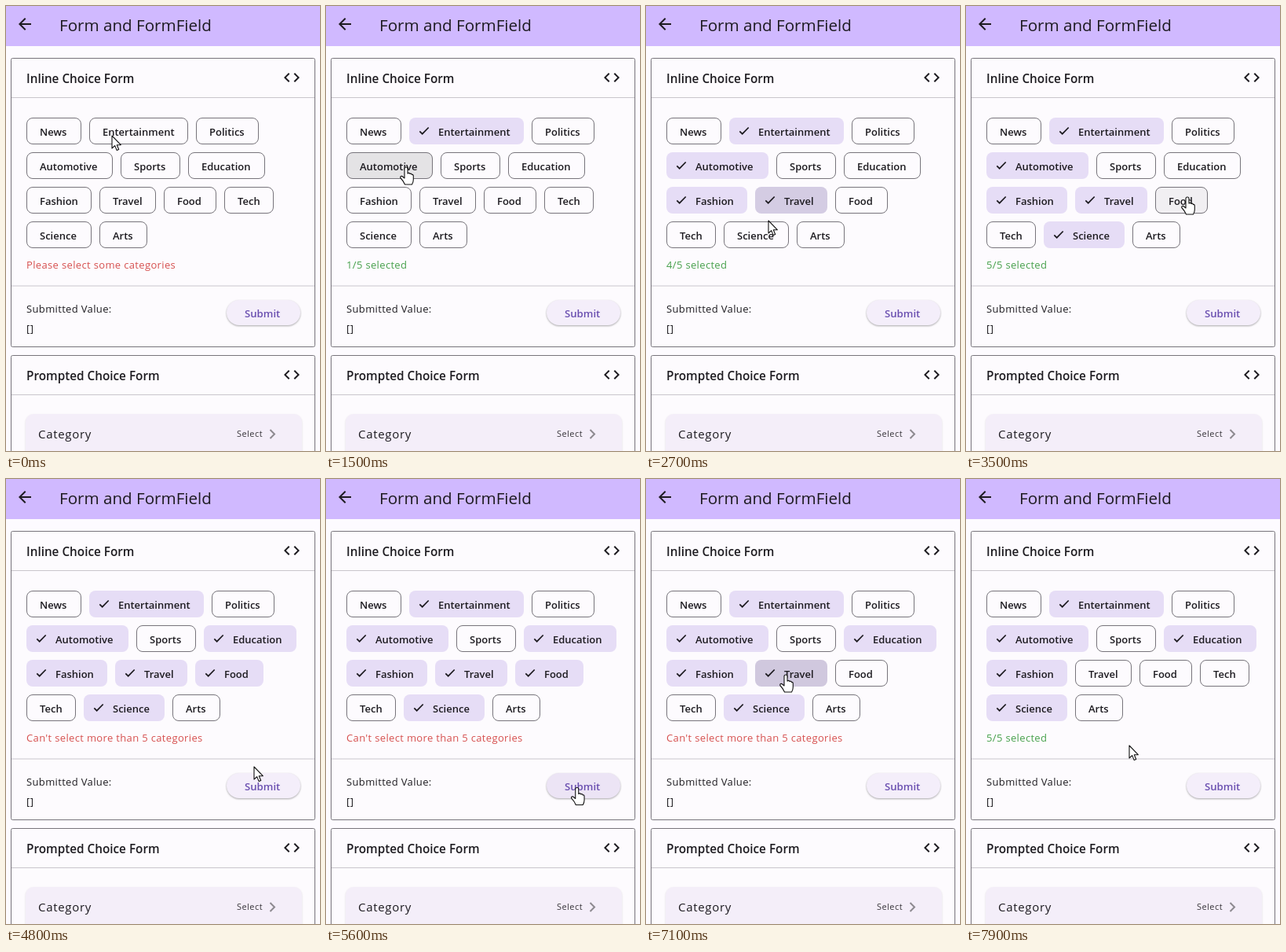
An HTML page that plays this animation: 400x566 px, repeating every 8 s.

```html
<!DOCTYPE html>
<html lang="en">
<head>
<meta charset="utf-8">
<title>Form and FormField</title>
<style>
  html, body { margin: 0; width: 100%; height: 100%; overflow: hidden; background: #fdfbff; }
  svg { display: block; font-family: "Open Sans", "Noto Sans", sans-serif; fill: #1d1b20; }
  .bar { fill: #d0b9ff; }
  .card { fill: #fdfbfe; stroke: #77747b; }
  .line { stroke: #c9c6cc; }
  .heading { font-size: 20.6px; }
  .title { font-size: 15.3px; font-weight: 600; }
  .body { font-size: 13px; letter-spacing: .35px; }
  .label { font-size: 13px; font-weight: 600; }
  .tile { fill: #f4eef9; filter: drop-shadow(0 1px 1px #0002); }
  .button { fill: #f4eefa; filter: drop-shadow(0 1px 1px #0005); }
  .fill { fill: #e6ddf6; }
  .edge { fill: none; stroke: #77747b; }
  .check { fill: none; stroke: #1d1b20; stroke-width: 1.7; }
  .pointer { fill: #fff; stroke: #111; stroke-width: 1.1; stroke-linejoin: round; }
</style>
</head>
<body>
<svg id="stage" width="400" height="566" viewBox="0 0 400 566">
  <defs>
    <path id="code" d="M9.4 16.6 4.8 12l4.6-4.6L8 6l-6 6 6 6zM14.6 16.6 19.2 12l-4.6-4.6L16 6l6 6-6 6z"/>
  </defs>
  <rect class="bar" width="400" height="51"/>
  <path transform="translate(12 11)" d="M20 11H7.83l5.59-5.59L12 4l-8 8 8 8 1.41-1.41L7.83 13H20z"/>
  <text class="heading" x="68" y="32">Form and FormField</text>

  <rect class="card" x="6.5" y="66.5" width="387" height="367" rx="2"/>
  <path class="line" d="M7 116.5H393M7 356H393"/>
  <text class="title" x="26" y="98">Inline Choice Form</text>
  <use href="#code" x="352" y="79"/>
  <g id="chips"></g>
  <text id="status" class="body" x="26" y="334"></text>
  <text class="body" x="26" y="390">Submitted Value:</text>
  <text class="body" x="26" y="415">[]</text>
  <rect class="button" x="281" y="374" width="94" height="32" rx="16"/>
  <rect id="submitShade" x="281" y="374" width="94" height="32" rx="16"/>
  <text class="label" x="304" y="396" style="fill:#6a4fb0;font-size:13.2px">Submit</text>

  <rect class="card" x="6.5" y="444.5" width="387" height="140" rx="2"/>
  <path class="line" d="M7 494.5H393"/>
  <text class="title" x="26" y="476">Prompted Choice Form</text>
  <use href="#code" x="352" y="457"/>
  <rect class="tile" x="25" y="519" width="352" height="60" rx="10"/>
  <text x="41" y="550" font-size="15" letter-spacing=".7">Category</text>
  <text x="294" y="548" font-size="11" letter-spacing=".45" fill="#39363c">Select</text>
  <path d="M336.5 539l5.5 5.5-5.5 5.5" fill="none" stroke="#8c898f" stroke-width="2"/>

  <path id="arrow" class="pointer" d="M0 0V16L3.7 12.6 6.2 18.6 8.7 17.5 6.3 11.7H11.3Z"/>
  <path id="hand" class="pointer" d="M-2 2Q-2 0 0 0Q2 0 2 2V8Q4 6.5 5 8.5Q6.7 7.5 7.4 9.5Q9.3 9 9.3 11.5V16Q9.3 19 7.5 22H-1.5Q-3 18-7.2 13.5Q-7.5 11-5 11.5L-2 14Z"/>
</svg>
<script>
const LOOP = 8000;
const HOVER = 0.05, PRESS = 0.14;
const $ = id => document.getElementById(id);
const clamp = v => Math.min(1, Math.max(0, v));
const easeOut = v => 1 - (1 - clamp(v)) ** 3;
const smooth = v => v * v * (3 - 2 * v);

function make(parent, tag, attrs) {
  const node = document.createElementNS("http://www.w3.org/2000/svg", tag);
  set(node, attrs);
  return parent.appendChild(node);
}
function set(node, attrs) {
  for (const key in attrs) node.setAttribute(key, attrs[key]);
}

// name, unselected width, click times
const chips = [
  ["News", 70], ["Entertainment", 126, 550], ["Politics", 80],
  ["Automotive", 110, 1530], ["Sports", 76], ["Education", 98, 4220],
  ["Fashion", 83, 1980], ["Travel", 72, 2480, 7130], ["Food", 67, 3650, 6650],
  ["Tech", 63], ["Science", 83, 3030], ["Arts", 61],
].map(([name, width, ...clicks]) => {
  const group = make($("chips"), "g", {});
  const rect = cls => make(group, "rect", { class: cls, height: 34, rx: 8 });
  const chip = { width, clicks, group, fill: rect("fill"), shade: rect("shade") };
  chip.edge = make(group, "rect", { class: "edge", x: .5, y: .5, height: 33, rx: 7.5 });
  chip.check = make(group, "path", { class: "check", d: "M13.3 17.3 16.7 20.7 24.7 12.5" });
  chip.text = make(group, "text", { class: "label", y: 23 });
  chip.text.textContent = name;
  return chip;
});
const submit = { x: 281, y: 374, w: 94, h: 33, clicks: [5350] };

// time, x, y of the pointer tip
const route = [
  [0, 135, 165], [300, 137, 166], [700, 137, 166], [1350, 102, 205], [1580, 102, 205],
  [1850, 85, 244], [2050, 85, 244], [2350, 165, 246], [2550, 165, 246],
  [2700, 156, 273], [2900, 155, 288], [3120, 155, 288], [3500, 282, 243],
  [3750, 282, 243], [4100, 300, 206], [4320, 300, 206], [4800, 316, 366],
  [5100, 319, 391], [5850, 320, 393], [6300, 265, 279], [6550, 268, 249],
  [6750, 268, 249], [7000, 178, 249], [7250, 178, 249], [7700, 205, 325], [7900, 208, 339],
];

function pointerAt(t) {
  const next = route.findIndex(p => p[0] > t);
  if (next < 0) return route[route.length - 1].slice(1);
  if (next === 0) return route[0].slice(1);
  const [t0, x0, y0] = route[next - 1], [t1, x1, y1] = route[next];
  const k = smooth((t - t0) / (t1 - t0));
  return [x0 + (x1 - x0) * k, y0 + (y1 - y0) * k];
}

function isOver(box, t) {
  const [x, y] = pointerAt(t);
  return t >= 100 && x >= box.x && x <= box.x + box.w && y >= box.y && y <= box.y + box.h;
}

// Hover fades over the last 100 ms; a press swells before the click and then decays.
function shadeOf(box, t) {
  let hover = 0;
  for (let i = 0; i < 5; i++) hover += isOver(box, t - i * 20) / 5;
  const press = Math.max(0, ...box.clicks.map(c =>
    t < c ? clamp((t - c + 80) / 120) : 1 - clamp((t - c) / 420)));
  return HOVER * hover + PRESS * press;
}

function selection(clicks, t) {
  const [on = Infinity, off = Infinity] = clicks;
  return easeOut((t - on) / 180) - easeOut((t - off) / 180);
}

function layout(t) {
  let x = 26, y = 142;
  for (const chip of chips) {
    chip.p = selection(chip.clicks, t);
    chip.w = chip.width + 20 * chip.p;
    chip.h = 34;
    if (x + chip.w > 374.5) { x = 26; y += 44; }
    chip.x = x;
    chip.y = y;
    x += chip.w + 10;
  }
}

function drawChip(chip, t) {
  const { x, y, w, p } = chip;
  set(chip.group, { transform: `translate(${x} ${y})` });
  set(chip.fill, { width: w, opacity: p });
  set(chip.shade, { width: w, opacity: shadeOf(chip, t) });
  set(chip.edge, { width: w - 1, opacity: 1 - p });
  set(chip.check, { opacity: p });
  set(chip.text, { x: 17 + 20 * p });
}

function drawStatus(t) {
  const count = chips.filter(c => c.clicks.filter(time => time <= t).length % 2).length;
  const valid = count > 0 && count <= 5;
  $("status").textContent = valid ? `${count}/5 selected`
    : count ? "Can't select more than 5 categories" : "Please select some categories";
  $("status").style.fill = valid ? "#46a04b" : "#d6504f";
}

function draw(t) {
  layout(t);
  chips.forEach(chip => drawChip(chip, t));
  drawStatus(t);
  set($("submitShade"), { opacity: shadeOf(submit, t) * .6, fill: "#6a4fb0" });
  const [x, y] = pointerAt(t);
  const over = [...chips, submit].some(box => isOver(box, t));
  for (const id of ["arrow", "hand"])
    set($(id), { transform: `translate(${x} ${y})`, visibility: over === (id === "hand") ? "visible" : "hidden" });
}

const start = performance.now();
function tick() {
  draw((performance.now() - start) % LOOP);
  requestAnimationFrame(tick);
}
tick();
</script>
</body>
</html>
```
